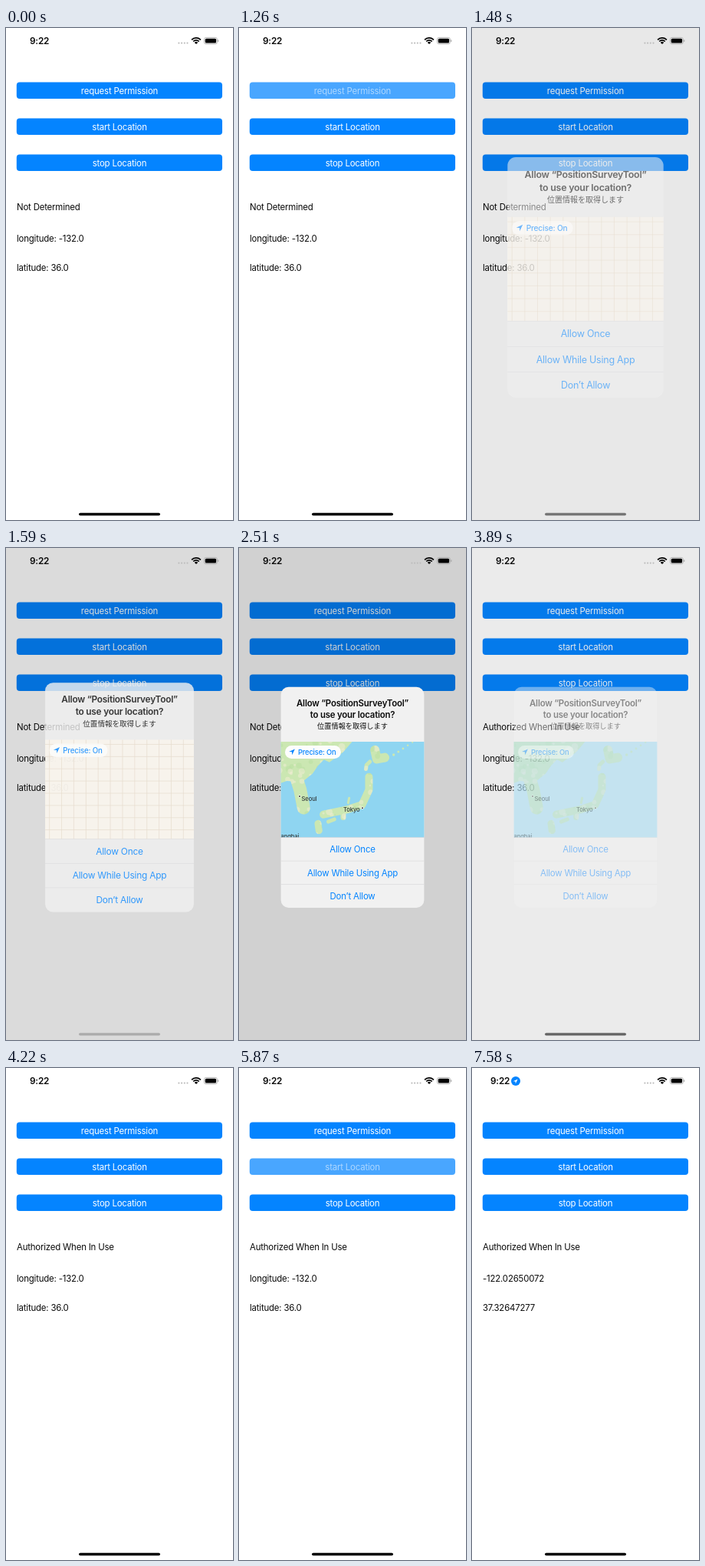
An HTML page with a canvas that plays this animation: 296x640 px, repeating every 8000 ms.

```html
<!DOCTYPE html>
<html lang="en">
<head>
<meta charset="utf-8">
<title>Location permission</title>
<style>
html, body { margin: 0; width: 100%; height: 100%; overflow: hidden; background: #fff; }
canvas { display: block; width: 296px; height: 640px; }
</style>
</head>
<body>
<canvas id="stage"></canvas>
<script>
const W = 296, H = 640, LOOP = 8000, MID = 148;
const BLUE = '#0484ff', INK = '#0a0a0a';
const SANS = 'Inter, "Noto Sans CJK JP", "Noto Sans CJK", sans-serif';
const dpr = window.devicePixelRatio || 1;

function setUp(canvas) {
  canvas.width = W * dpr;
  canvas.height = H * dpr;
  const c = canvas.getContext('2d');
  c.scale(dpr, dpr);
  return c;
}
const ctx = setUp(document.getElementById('stage'));

const clamp = v => Math.min(1, Math.max(0, v));
const stepped = (t, start) => start + Math.floor((t - start) / 110) * 110;

function text(str, x, y, { size = 11.45, weight = 400, color = INK, align = 'left', track = -0.2 } = {}) {
  ctx.font = `${weight} ${size}px ${SANS}`;
  ctx.letterSpacing = track + 'px';
  ctx.textAlign = align;
  ctx.fillStyle = color;
  ctx.fillText(str, x, y);
}

function box(x, y, w, h, r, color) {
  ctx.fillStyle = color;
  ctx.beginPath();
  ctx.roundRect(x, y, w, h, r);
  ctx.fill();
}

function dot(x, y, r, color, c = ctx) {
  c.fillStyle = color;
  c.beginPath();
  c.arc(x, y, r, 0, Math.PI * 2);
  c.fill();
}

function arrow(x, y, s, color) {
  ctx.fillStyle = color;
  ctx.beginPath();
  ctx.moveTo(x + s, y - s);
  ctx.lineTo(x - s, y - s * 0.05);
  ctx.lineTo(x, y);
  ctx.lineTo(x + s * 0.05, y + s);
  ctx.fill();
}

function withAlpha(a, draw) {
  const before = ctx.globalAlpha;
  ctx.globalAlpha = before * a;
  draw();
  ctx.globalAlpha = before;
}

// Mercator projection, anchored at Seoul.
const SEOUL = [126.98, 37.57], TOKYO = [139.68, 35.68], PX_PER_DEG = 6.45;
const mercator = lat => Math.log(Math.tan(Math.PI / 4 + lat * Math.PI / 360)) * 180 / Math.PI;
const project = ([lon, lat]) => [
  79 + PX_PER_DEG * (lon - SEOUL[0]),
  323 - PX_PER_DEG * (mercator(lat) - mercator(SEOUL[1]))
];

function trace(c, coords) {
  c.beginPath();
  coords.forEach(p => c.lineTo(...project(p)));
}

function random(seed) {
  return () => (seed = (seed * 16807) % 2147483647) / 2147483647;
}

function paintLand() {
  const layer = document.createElement('canvas');
  const c = setUp(layer);
  const rand = random(271);
  const stroke = (width, ...coords) => {
    c.lineWidth = width;
    trace(c, coords);
    c.stroke();
  };
  c.fillStyle = c.strokeStyle = '#cbe7b2';
  c.lineCap = c.lineJoin = 'round';

  trace(c, [[120, 49], [141, 49], [138.5, 46.5], [135.8, 44.3], [133, 42.8], [131.9, 43.2],
    [130.7, 42.3], [129.6, 41.1], [127.5, 39.8], [124.4, 40], [120, 38.8]]);
  c.fill();
  stroke(17, [126.4, 40.3], [127.1, 38.6], [127.8, 35.7]);                              // Korea
  stroke(10, [141, 40.6], [141, 38.6], [139.6, 36.2], [136.5, 35.4], [131.8, 34.6]);    // Honshu
  stroke(7, [135.8, 34.8], [135.8, 34.1]);
  stroke(3, [136.8, 36.5], [137, 37.3]);
  stroke(12, [142.2, 44.6], [142.6, 43.3], [144.2, 43.5]);                              // Hokkaido
  stroke(5, [141.2, 42.9], [140.5, 42.4], [140.4, 41.8]);
  stroke(9, [130.7, 33.1], [130.9, 31.9]);                                              // Kyushu
  stroke(5, [132.8, 33.4], [134, 33.8]);                                                // Shikoku
  stroke(3, [142.2, 47], [142.2, 46.2]);                                                // Sakhalin
  for (let i = 0; i < 6; i++) {
    dot(...project([146 + i * 0.95, 43.9 + i * 0.45]), 1.7 - i * 0.15, '#cbe7b2', c);
  }

  c.globalCompositeOperation = 'source-atop';
  c.globalAlpha = 0.5;
  for (let i = 0; i < 160; i++) {
    dot(52 + rand() * 145, 250 + rand() * 125, 1 + rand() * 3.5, rand() < 0.6 ? '#f3eed8' : '#b9e0a2', c);
  }
  return layer;
}
const land = paintLand();

function grid() {
  ctx.fillStyle = '#fbf6ed';
  ctx.fillRect(54, 252, 188, 125);
  ctx.strokeStyle = '#e6dccd';
  ctx.lineWidth = 0.8;
  ctx.beginPath();
  for (let d = 6; d < 190; d += 15.3) {
    ctx.moveTo(54 + d, 252);
    ctx.lineTo(54 + d, 377);
    ctx.moveTo(54, 252 + d);
    ctx.lineTo(242, 252 + d);
  }
  ctx.stroke();
}

function map(loaded) {
  const label = { size: 7.6, weight: 500, color: '#333a3c', track: -0.1 };
  ctx.save();
  ctx.beginPath();
  ctx.rect(54.6, 252, 186.8, 124.5);
  ctx.clip();
  if (loaded) {
    ctx.fillStyle = '#8fd5f1';
    ctx.fillRect(54, 252, 188, 125);
    ctx.drawImage(land, 0, 0, W, H);
    [SEOUL, TOKYO].map(project).forEach(([x, y]) => {
      dot(x, y, 1.7, '#fff');
      dot(x, y, 1, '#333');
    });
    text('Seoul', 81.5, 329, label);
    text('Tokyo', 136, 342.5, label);
    text('anghai', 54.5, 378, label);
  } else {
    grid();
  }
  ctx.restore();
}

function alertCard(scale, alpha, loaded, pressed) {
  const bold = { align: 'center', weight: 600, size: 11.4 };
  const rowTop = i => 376.3 + i * 30.5;
  ctx.save();
  ctx.translate(MID, 324.5);
  ctx.scale(scale, scale);
  ctx.translate(-MID, -324.5);
  ctx.globalAlpha = alpha;
  box(54.6, 180.8, 186.8, 287.2, 10, '#f1f1f1');
  if (pressed) {
    ctx.fillStyle = '#dedede';
    ctx.fillRect(54.6, rowTop(1), 186.8, 30.5);
  }
  text('Allow “PositionSurveyTool”', MID, 206, bold);
  text('to use your location?', MID, 221, bold);
  text('位置情報を取得します', MID, 235, { align: 'center', size: 9.2, track: 0 });
  map(loaded);
  box(60, 257, 73, 17, 8.5, '#fdfdfd');
  arrow(69, 265.3, 3.9, BLUE);
  text('Precise: On', 77, 268.7, { size: 9.3, weight: 500, color: BLUE, track: -0.15 });
  ['Allow Once', 'Allow While Using App', 'Don’t Allow'].forEach((label, i) => {
    ctx.fillStyle = '#d6d6d8';
    ctx.fillRect(54.6, rowTop(i), 186.8, 0.6);
    text(label, MID, rowTop(i) + 19.8, { align: 'center', color: BLUE });
  });
  ctx.restore();
}

function button(label, y, press) {
  withAlpha(1 - 0.28 * press, () => box(13.8, y, 268.2, 21.5, 4, BLUE));
  withAlpha(1 - 0.45 * press, () => text(label, MID, y + 15, { color: '#fff', align: 'center' }));
}

function wifi(x, y) {
  const fan = r => ctx.arc(x, y, r, -Math.PI * 0.76, -Math.PI * 0.24);
  ctx.strokeStyle = ctx.fillStyle = '#000';
  ctx.lineWidth = 1.8;
  [8.1, 5.1].forEach(r => {
    ctx.beginPath();
    fan(r);
    ctx.stroke();
  });
  ctx.beginPath();
  ctx.moveTo(x, y);
  fan(3);
  ctx.fill();
}

function battery(x, y) {
  ctx.strokeStyle = '#a6a6a6';
  ctx.lineWidth = 0.8;
  ctx.beginPath();
  ctx.roundRect(x, y, 17, 8.4, 2.5);
  ctx.stroke();
  box(x + 1.3, y + 1.3, 14.4, 5.8, 1.5, '#000');
  box(x + 17.8, y + 2.8, 1.1, 2.8, 0.6, '#a6a6a6');
}

function statusBar(shift) {
  text('9:22', 31 - 7 * shift, 21, { size: 11.8, weight: 600 });
  withAlpha(shift, () => {
    dot(57, 17, 6 * (0.6 + 0.4 * shift), BLUE);
    arrow(56.6, 17.4, 3 * shift, '#fff');
  });
  for (let i = 0; i < 4; i++) dot(225.4 + i * 3.7, 19.6, 1.1, '#bdbdbd');
  wifi(248, 21);
  battery(258.4, 12.4);
}

// Full while pressed, half on release, then back to normal.
function pressAt(t, start) {
  const d = t - start;
  return d < 0 || d >= 220 ? 0 : d < 110 ? 1 : 0.5;
}

function readings(t) {
  if (t < 6200) return ['longitude: -132.0', 'latitude: 36.0'];
  if (t < 7580) return ['-122.02646815', '37.32644928'];
  return ['-122.02650072', '37.32647277'];
}

function render(t) {
  const open = t >= 1480 && t < 4220;
  const enter = t >= 1930 ? 1 : clamp(1 - Math.exp(-(stepped(t, 1260) - 1388) / 130));
  const leave = t < 3890 ? 1 : Math.exp(-(stepped(t, 3780) - 3780) / 135);
  const shown = open ? enter * leave : 0;

  ctx.fillStyle = '#fff';
  ctx.fillRect(0, 0, W, H);

  button('request Permission', 70.5, pressAt(t, 1260));
  button('start Location', 117.5, pressAt(t, 5870));
  button('stop Location', 164.5, 0);

  const [lon, lat] = readings(t);
  text(t < 3890 ? 'Not Determined' : 'Authorized When In Use', 14, 237);
  text(lon, 14, 278.2);
  text(lat, 14, 315.5);

  ctx.fillStyle = `rgba(0,0,0,${0.18 * shown})`;
  ctx.fillRect(0, 0, W, H);

  const slide = clamp((stepped(t, 6090) - 6090) / 430);
  statusBar(slide * (2 - slide));
  withAlpha(1 - shown, () => box(95, 630.8, 106, 3.5, 1.75, '#000'));

  if (open) alertCard(1.18 - 0.18 * enter, (0.1 + 0.9 * enter) * leave, t >= 1700, t >= 3640 && t < 3780);
}

function tick() {
  render(performance.now() % LOOP);
  requestAnimationFrame(tick);
}
tick();
</script>
</body>
</html>
```
